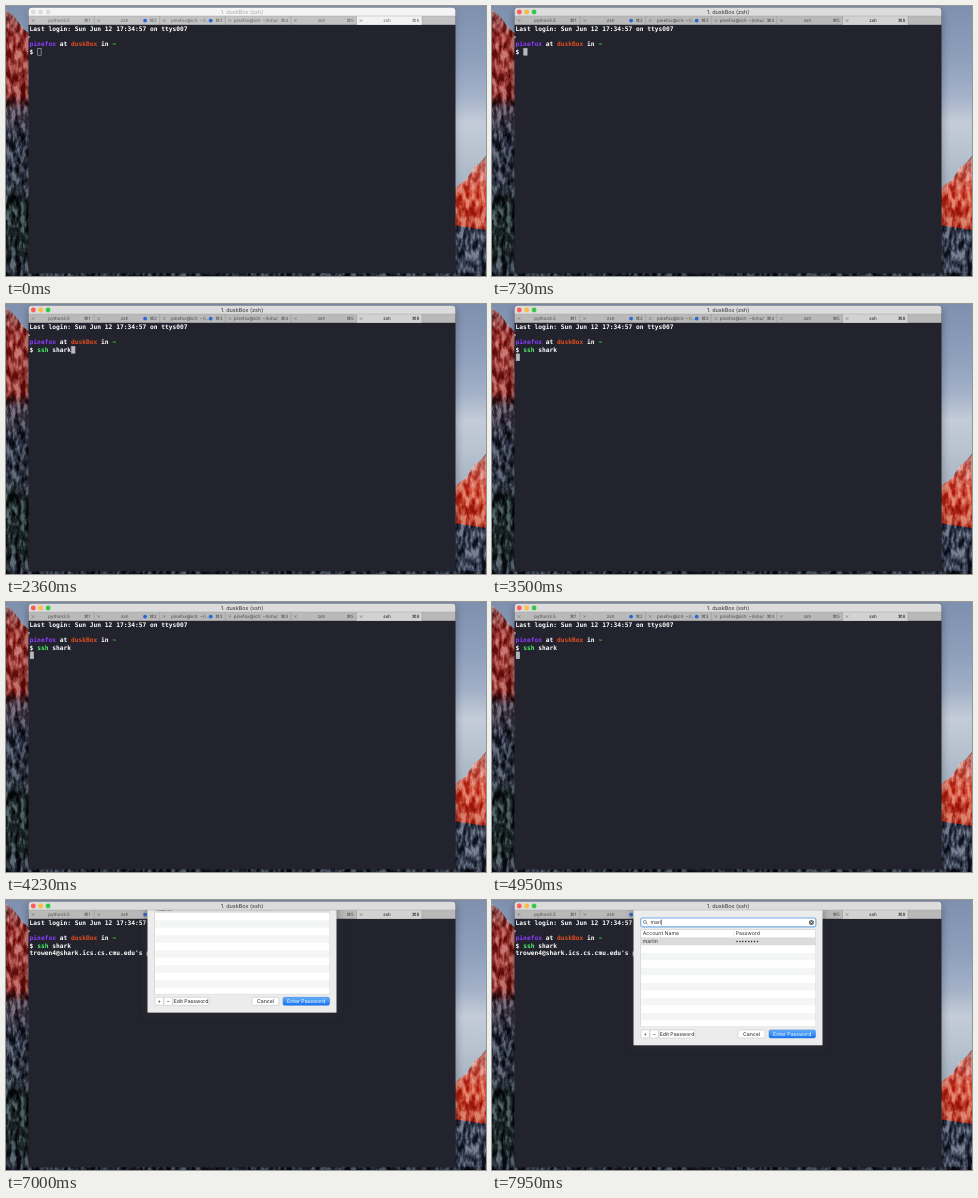
Recreate the animation shown at these times as an HTML page. Size 480 by 270 pixels, loop 8000 ms.

```html
<!DOCTYPE html>
<html lang="en">
<head>
<meta charset="utf-8">
<title>Terminal login</title>
<style>
  html, body { margin: 0; width: 100%; height: 100%; overflow: hidden; background: #252b39; }
  svg { display: block; width: 100vw; height: 100vh; }
  text { text-rendering: geometricPrecision; white-space: pre; }
  .ui { font: 5.2px Inter, sans-serif; fill: #333; }
  .tab { font-size: 4.5px; fill: #4c4c4c; }
  .tab.active { fill: #1c1c1c; }
  .term { font: bold 6.25px "DejaVu Sans Mono", monospace; fill: #fff; }
  .mid { text-anchor: middle; }
  .idle .tab { fill: #666; }
  .idle #title { fill: #aaa; }
</style>
</head>
<body>
<svg viewBox="0 0 480 270" preserveAspectRatio="none">
  <defs>
    <linearGradient id="sky" x2="0" y2="1">
      <stop stop-color="#7f90ae"/><stop offset=".2" stop-color="#8fa0bd"/>
      <stop offset=".33" stop-color="#a3b1c8"/><stop offset=".43" stop-color="#c3ccd8"/>
      <stop offset=".53" stop-color="#bac4d1"/><stop offset=".66" stop-color="#a9b5c5"/>
    </linearGradient>
    <linearGradient id="cliff" x2="0" y2="1">
      <stop stop-color="#8a5355"/><stop offset=".1" stop-color="#a33c37"/>
      <stop offset=".32" stop-color="#933430"/><stop offset=".37" stop-color="#3d313e"/>
      <stop offset=".5" stop-color="#2c3243"/><stop offset=".66" stop-color="#272d3a"/>
      <stop offset=".72" stop-color="#1c2729"/><stop offset=".9" stop-color="#1c2729"/>
      <stop offset="1" stop-color="#282f3d"/>
    </linearGradient>
    <linearGradient id="peak" x2="0" y2="1">
      <stop stop-color="#d19a94"/><stop offset=".25" stop-color="#d4786b"/>
      <stop offset=".5" stop-color="#d04a34"/><stop offset="1" stop-color="#b83e2c"/>
    </linearGradient>
    <linearGradient id="blue" x2="0" y2="1">
      <stop stop-color="#65b0fa"/><stop offset="1" stop-color="#1773ee"/>
    </linearGradient>
    <filter id="rock" x="0" y="0" width="1" height="1" color-interpolation-filters="sRGB">
      <feTurbulence type="fractalNoise" baseFrequency=".2 .09" numOctaves="3" seed="4"/>
      <feColorMatrix values="2.6 0 0 0 -.8  2.6 0 0 0 -.8  2.6 0 0 0 -.8  0 0 0 0 1"/>
      <feBlend in2="SourceGraphic" mode="soft-light"/>
      <feComposite in2="SourceGraphic" operator="in"/>
    </filter>
    <filter id="blur" x="-20%" y="-20%" width="140%" height="140%"><feGaussianBlur stdDeviation="4"/></filter>
    <clipPath id="belowTitle"><path d="M0 10H480V270H0z"/></clipPath>
  </defs>

  <!-- Desktop -->
  <rect width="480" height="270" fill="url(#sky)"/>
  <g filter="url(#rock)">
    <path d="M0 4L8 10 15 20 25 30V270H0z" fill="url(#cliff)"/>
    <path d="M446 185L454 178 461 173 468 161 474 157 480 150V226H446z" fill="url(#peak)"/>
    <path d="M446 219L480 224V270H446z" fill="#373f53"/>
    <path d="M0 267H480V270H0z" fill="#252b39"/>
  </g>
  <rect id="shadow" x="22" y="4" width="428" height="265" rx="4" filter="url(#blur)"/>

  <!-- Terminal window -->
  <path d="M22.5 267.3V5q0-3.5 3.5-3.5H446q3.5 0 3.5 3.5V267.3z" fill="#22232d"/>
  <g id="tabs">
    <rect id="tabBar" x="22.5" y="10" width="427" height="8.8"/>
    <rect id="activeTab" x="350.5" y="10" width="65.6" height="8.8"/>
  </g>

  <g class="term">
    <text x="23.6" y="25.3">Last login: Sun Jun 12 17:34:57 on ttys007</text>
    <text x="21" y="32.8">›</text>
    <text x="23.6" y="40.3"><tspan fill="#8d3cff">pinefox</tspan> at <tspan fill="#e04e20">duskBox</tspan> in <tspan fill="#55e04d">~</tspan></text>
    <text x="23.6" y="47.8">$ <tspan id="command"></tspan><tspan id="host"></tspan></text>
    <text x="23.6" y="55.3" id="prompt">trowen4@shark.ics.cs.cmu.edu's password:</text>
  </g>
  <rect id="cursor" width="3.4" height="6.8" stroke="#b8b8bd" stroke-width=".6"/>

  <!-- Password sheet -->
  <g clip-path="url(#belowTitle)">
    <g id="sheet" class="ui">
      <rect x="141" y="8" width="190" height="139" opacity=".5" filter="url(#blur)"/>
      <rect x="141.5" y="0" width="189" height="145.3" fill="#ececec"/>
      <rect x="148.7" y="18" width="175.2" height="8.8" rx="1.8" fill="#fff" stroke="#76aee8" stroke-width="1.2"/>
      <g fill="none" stroke="#555" stroke-width=".6"><circle cx="152.9" cy="21.9" r="1.5"/><path d="M154 23l1.6 1.6"/></g>
      <text id="search" x="158.5" y="24.2"></text>
      <rect id="caret" y="19.5" width=".5" height="5.8" fill="#222"/>
      <g id="clear">
        <circle cx="319.4" cy="22.4" r="2.5" fill="#666"/>
        <path d="M318.4 21.4l2 2m0-2l-2 2" stroke="#fff" stroke-width=".6"/>
      </g>
      <rect x="148.8" y="29.6" width="174.8" height="97" fill="#fff" stroke="#c4c4c4" stroke-width=".5"/>
      <g id="rows"></g>
      <path d="M149 37.7H323.5M242 30.5V37" stroke="#ccc" stroke-width=".5"/>
      <text x="150.7" y="35.4">Account Name</text><text x="243.8" y="35.4">Password</text>
      <text x="150.7" y="43.4">marlin</text><text x="243.5" y="43.4">••••••••</text>
      <g id="buttons"></g>
    </g>
  </g>

  <!-- Title bar -->
  <path id="titleBar" d="M22.5 10V5q0-3.5 3.5-3.5H446q3.5 0 3.5 3.5V10z"/>
  <path d="M22.5 10H449.5" stroke="#999" stroke-width=".4"/>
  <g id="lights"></g>
  <text id="title" class="ui mid" x="236" y="8" style="font-size:5.5px"></text>
</svg>

<script>
const LOOP = 8000;
const FOCUS = 330, ENTER = 2800, RETITLE = 3900, PROMPT = 6450, SHEET = 6850;
const COMMAND = "ssh shark";
const commandKeys = [1060, 1200, 1340, 1500, 1690, 1830, 1960, 2090, 2220];
const SEARCH = "marl";
const searchKeys = [7380, 7530, 7680, 7820];
const PITCH = 3.7627;

const $ = id => document.getElementById(id);
const set = (node, attrs) => { for (const key in attrs) node.setAttribute(key, attrs[key]); };
const add = (parent, tag, attrs, text = "") => {
  const node = document.createElementNS("http://www.w3.org/2000/svg", tag);
  set(node, attrs);
  node.textContent = text;
  parent.append(node);
  return node;
};
const show = (id, visible) => { $(id).style.display = visible ? "" : "none"; };
const typed = (text, keys, t) => text.slice(0, keys.filter(k => k <= t).length);

const labels = ["python3.5", "zsh", "pinefox@ich: ~/l…", "pinefox@ich: ~/lohu/", "zsh", "zsh"];
const tabNames = labels.map((label, i) => {
  const x = 22.5 + i * 65.6, tabs = $("tabs");
  const style = i === 5 ? "ui tab active" : "ui tab";
  add(tabs, "path", { d: `M${x + 65.6} 10v8.8`, stroke: "#888", "stroke-width": .4 });
  add(tabs, "path", { d: `M${x + 3.3} 13.3l2.5 2.5m0-2.5l-2.5 2.5`, stroke: "#666", "stroke-width": .5 });
  add(tabs, "text", { x: x + 55.5, y: 16.3, class: style }, "⌘" + (i < 5 ? i + 1 : 8));
  if (i === 1 || i === 2) add(tabs, "circle", { cx: x + 51, cy: 14.6, r: 1.9, fill: "#2867d6" });
  return add(tabs, "text", { x: x + 30.5, y: 16.3, class: style + " mid" }, label);
});

const lights = ["#fc5b57", "#fdbd3f", "#34c84a"].map((color, i) =>
  [add($("lights"), "circle", { cx: 27.3 + i * 7.4, cy: 6, r: 2.4 }), color]);

for (let i = 0; i < 12; i++) {
  const y = 38 + i * 7.5;
  add($("rows"), "rect", {
    x: 149, y, width: 174.4, height: Math.min(7.5, 126.4 - y),
    fill: i === 0 ? "#dcdcdc" : i % 2 ? "#fff" : "#f4f5f5"
  });
}

const buttons = [["+", 149, 8.6], ["−", 158, 8.6], ["Edit Password", 167, 36],
                 ["Cancel", 246, 27], ["Enter Password", 277, 46.5]];
buttons.forEach(([label, x, width], i) => {
  const primary = i === 4;
  add($("buttons"), "rect", {
    x, y: 130, width, height: 8, rx: i < 3 ? .6 : 1.6,
    fill: primary ? "url(#blue)" : "#fff", stroke: primary ? "#2878dc" : "#bcbcbc", "stroke-width": .5
  });
  const text = add($("buttons"), "text", { x: x + width / 2, y: 135.9, class: "mid" }, label);
  text.style.fill = primary ? "#fff" : "#222";
});

function render(t) {
  const focused = t >= FOCUS, entered = t >= ENTER, prompted = t >= PROMPT;

  document.querySelector("svg").classList.toggle("idle", !focused);
  set($("titleBar"), { fill: focused ? "#dcdcdc" : "#f4f4f4" });
  set($("tabBar"), { fill: focused ? "#b9b9b9" : "#c3c3c3" });
  set($("activeTab"), { fill: focused ? "#d2d2d2" : "#f2f2f2" });
  set($("shadow"), { opacity: focused ? .3 : .15 });
  lights.forEach(([light, color]) => set(light, { fill: focused ? color : "#dcdcdc" }));
  $("title").textContent = `1. duskBox (${t < RETITLE ? "zsh" : "ssh"})`;
  tabNames[5].textContent = entered ? "ssh" : "zsh";

  const line = typed(COMMAND, commandKeys, t);
  $("command").textContent = line.slice(0, 3);
  set($("command"), { fill: line.length < 3 ? "#f04a3e" : "#4ff06a" });
  $("host").textContent = line.slice(3);
  show("prompt", prompted);
  const column = prompted ? 41 : entered ? 0 : 2 + line.length;
  set($("cursor"), {
    x: 24.2 + column * PITCH, y: entered ? 49.9 : 42.4,
    fill: focused ? "#b8b8bd" : "none"
  });

  const progress = Math.min(1, Math.max(0, (t - SHEET) / 220));
  const eased = progress * progress * (3 - 2 * progress);
  show("sheet", progress > 0);
  set($("sheet"), { transform: `translate(0 ${-140 * (1 - eased)})` });
  const query = typed(SEARCH, searchKeys, t);
  $("search").textContent = query;
  show("clear", query);
  const queryWidth = query && progress > 0 ? $("search").getComputedTextLength() : 0;
  set($("caret"), { x: 158.7 + queryWidth });
}

function tick() {
  render(performance.now() % LOOP);
  requestAnimationFrame(tick);
}
tick();
</script>
</body>
</html>
```
